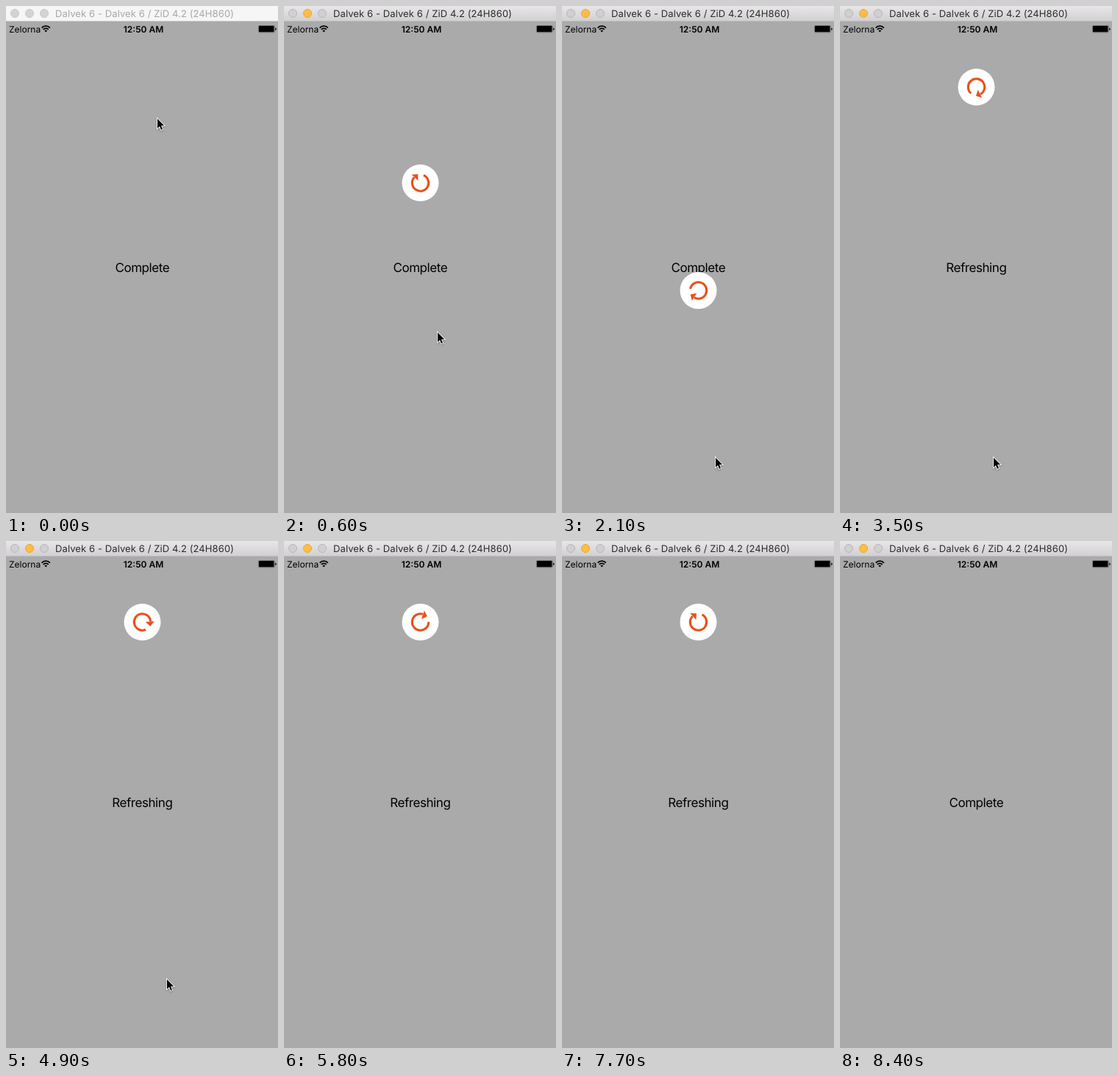
Recreate the animation shown at these times as an HTML page. Size 370 by 688 pixels, loop 8800 ms.

```html
<!DOCTYPE html>
<html lang="en">
<head>
<meta charset="utf-8">
<title>Pull to refresh</title>
<style>
  html, body { margin: 0; width: 100%; height: 100%; overflow: hidden; background: #aaa; }
  svg { display: block; width: 370px; height: 688px; font-family: Inter, Roboto, sans-serif; text-rendering: geometricPrecision; }
  #label { font-size: 17px; letter-spacing: -.43px; text-anchor: middle; }
  .status { font-size: 12px; }
  .clock { font-weight: 600; text-anchor: middle; }
  #bar { --text: #2c2c2c; --light: #d1cfd1; --edge: #b8b6b8; --middle: #fdbe41; --middle-edge: #e3a83f; }
  #bar.inactive { --text: #a6a6a6; --light: #d3d3d3; --edge: #c6c6c6; --middle: #d3d3d3; --middle-edge: #c6c6c6; }
  #bar text { font-size: 13px; letter-spacing: .1px; fill: var(--text); }
  #bar circle { fill: var(--light); stroke: var(--edge); }
  #bar .middle { fill: var(--middle); stroke: var(--middle-edge); }
  #bar.inactive .active-fill { display: none; }
  #cursor { filter: drop-shadow(0 1px 1px rgba(0, 0, 0, .3)); }
</style>
</head>
<body>
<svg viewBox="0 0 370 688">
  <defs>
    <linearGradient id="metal" x2="0" y2="1">
      <stop stop-color="#e8e6e8"/>
      <stop offset="1" stop-color="#d2d0d2"/>
    </linearGradient>
  </defs>
  <rect width="370" height="688" fill="#aaa"/>
  <text id="label" x="185.3" y="361"></text>

  <g id="ball">
    <circle r="25" fill="#fff"/>
    <g id="icon">
      <path id="ring" fill="none" stroke="#e6511b" stroke-width="3.1"/>
      <path d="M-11.8-11.3L-3.2-11.7V-2.9Z" fill="#e6511b"/>
    </g>
  </g>

  <text class="status" x="4" y="35.5">Zelorna</text>
  <g fill="none" stroke="#000" stroke-width="1.8">
    <path d="M48.6 29.6a7.7 7.7 0 0 1 11.2 0M50.7 31.9a4.8 4.8 0 0 1 7 0"/>
    <path d="M54.2 35.6l-1.9-2a2.7 2.7 0 0 1 3.8 0z" fill="#000" stroke="none"/>
  </g>
  <text class="status clock" x="187" y="35.5">12:50 AM</text>
  <rect x="343.4" y="26.5" width="22" height="9.4" rx="1.5" fill="none" stroke="#444" stroke-width=".5"/>
  <rect x="344" y="27" width="20.5" height="8.3" rx=".8"/>
  <path d="M366.3 29.4q1.4.4 1.4 1.8t-1.4 1.8z"/>

  <g id="bar">
    <rect width="370" height="20.5" fill="#f6f6f6"/>
    <g class="active-fill">
      <rect width="370" height="20" fill="url(#metal)"/>
      <rect y="20" width="370" height=".6" fill="#b4b2b4"/>
    </g>
    <circle cx="12" cy="10" r="5.5"/>
    <circle class="middle" cx="32" cy="10" r="5.5"/>
    <circle cx="52" cy="10" r="5.5"/>
    <text x="67" y="15">Dalvek 6 - Dalvek 6 / ZiD 4.2 (24H860)</text>
  </g>

  <path id="cursor" d="M0 0V13L3 10.3L5 15L7 14.2L5 9.6L9.2 9.3Z"
        stroke="#fff" stroke-width="1.8" paint-order="stroke"/>
</svg>

<script>
const LOOP = 8800, LAST_STEP = 8400, STEP = 100;
const RELEASE = 2150, FINISH = 7955, SLIDE = 400;
const HIDDEN_Y = -5, REST_Y = 110, PULLED_Y = 386;

// [time, x, y] of the pointer tip
const pointerPath = [
  [0, 206, 153], [100, 206, 158], [200, 208, 190], [400, 209, 336], [600, 209, 443],
  [900, 209, 506], [1600, 209, 613], [4000, 209, 613], [4500, 218, 598],
  [4900, 219, 595], [5300, 333, 560]
];

const byId = id => document.getElementById(id);
const mix = (a, b, p) => a + (b - a) * p;
const ease = p => { p = Math.min(1, Math.max(0, p)); return p * p * (3 - 2 * p); };
const polar = (r, deg) => [r * Math.cos(deg * Math.PI / 180), r * Math.sin(deg * Math.PI / 180)];

byId("ring").setAttribute("d", `M${polar(11.2, -67)}A11.2 11.2 0 1 1 ${polar(11.2, -138)}`);

function pointerAt(t) {
  const next = pointerPath.findIndex(key => key[0] > t);
  if (next < 0) return pointerPath.at(-1).slice(1);
  const [t0, x0, y0] = pointerPath[next - 1], [t1, x1, y1] = pointerPath[next];
  const p = (t - t0) / (t1 - t0);
  return [mix(x0, x1, p), mix(y0, y1, p)];
}

function ballY(t, pointerY) {
  if (t < RELEASE) return Math.max(HIDDEN_Y, 240 + (pointerY - 443) * .859);
  if (t < FINISH) return mix(PULLED_Y, REST_Y, ease((t - RELEASE) / SLIDE));
  return mix(REST_Y, HIDDEN_Y, ease((t - FINISH) / SLIDE));
}

function draw(t) {
  const [x, y] = pointerAt(t);
  const ball = ballY(t, y);
  // Turned by the pull while dragging, then about two turns a second
  const angle = t < RELEASE ? (ball - 240) * 1.77 : 198 + (t - 3500) * .725;

  byId("cursor").setAttribute("transform", `translate(${x} ${y})`);
  byId("cursor").style.display = t > 5300 ? "none" : "";
  byId("ball").setAttribute("transform", `translate(185.5 ${ball})`);
  byId("icon").setAttribute("transform", `rotate(${angle})`);
  byId("label").textContent = t >= RELEASE && t < FINISH ? "Refreshing" : "Complete";
  byId("bar").setAttribute("class", t < 100 ? "inactive" : "");
}

const start = performance.now();
function tick() {
  const t = (performance.now() - start) % LOOP;
  draw(Math.min(LAST_STEP, Math.floor(t / STEP) * STEP));
  requestAnimationFrame(tick);
}
tick();
</script>
</body>
</html>
```
